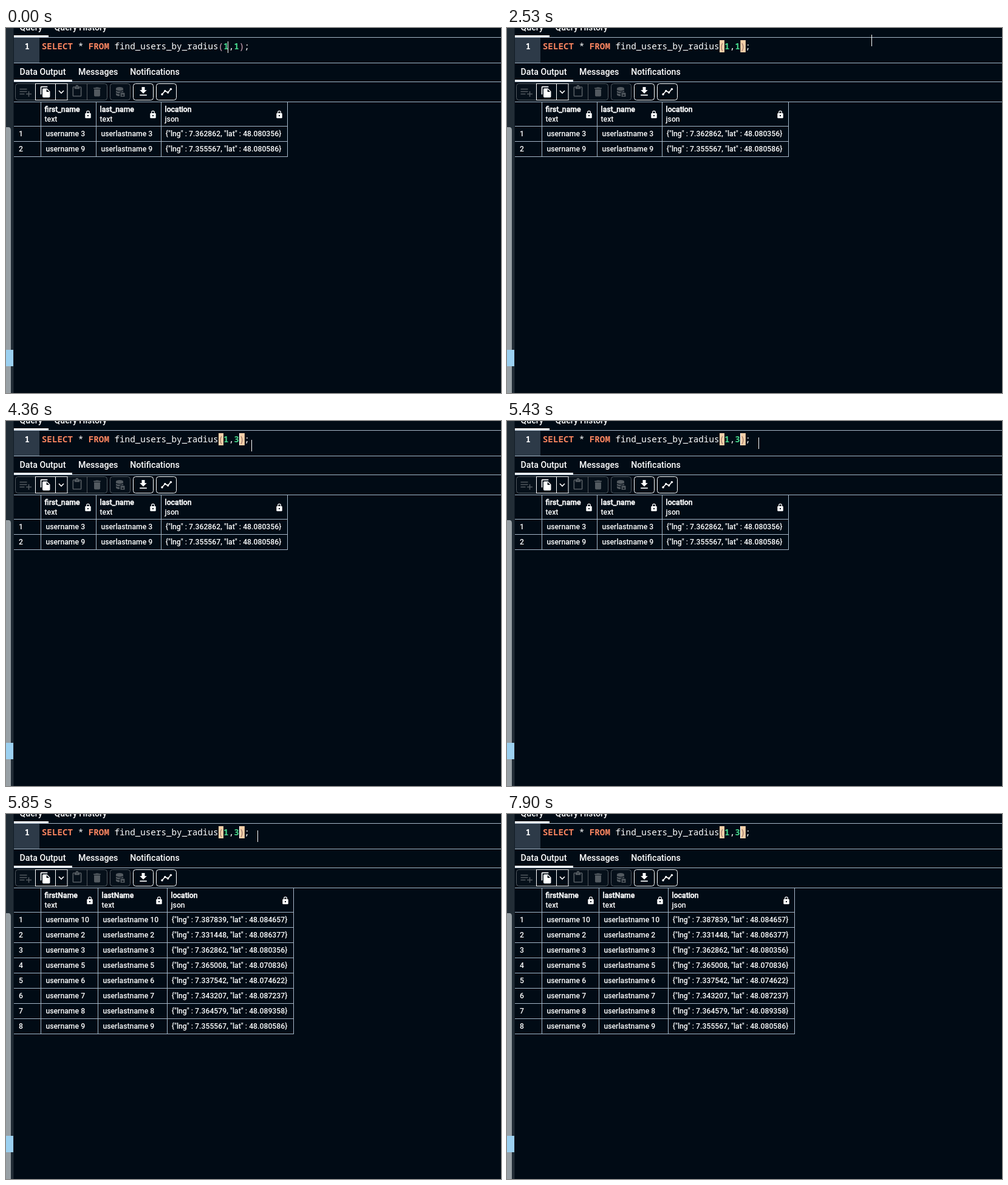
These frames come from a looping animation (815x600 px, 8 s). An HTML page:

```html
<!DOCTYPE html>
<html lang="en">
<head>
<meta charset="utf-8">
<title>Radius query</title>
<style>
  html, body { margin: 0; width: 100%; height: 100%; overflow: hidden; background: #010b15; }
  svg { display: block; width: 815px; height: 600px; }
  text { font-family: Roboto, sans-serif; font-weight: 500; fill: #fff; white-space: pre; }
  .tab { font-size: 14.2px; }
  .cell { font-size: 12.25px; }
  .head { font-size: 12.25px; stroke: #fff; stroke-width: .45px; }
  .code { font: 500 14.25px "Noto Sans Mono", monospace; }
  .kw { font-weight: 700; fill: #f8845f; }
  .num { font-weight: 700; fill: #45d48a; }
  .par { fill: #d6aabb; }
  .matched .par { fill: #9a7468; }
  .wait { font-size: 16.1px; }
</style>
</head>
<body>
<svg id="stage" viewBox="0 0 815 600" xmlns="http://www.w3.org/2000/svg"></svg>
<script>
const LOOP = 8000;
const BG = '#010b15', LINE = '#a6b7c8';
const CODE_X = 58.8, CHAR = 8.55;

const rect = (x, y, w, h, fill, extra = '') =>
  `<rect x="${x}" y="${y}" width="${w}" height="${h}" fill="${fill}" ${extra}/>`;
const text = (x, y, cls, str) => `<text x="${x}" y="${y}" class="${cls}">${str}</text>`;
const stroke = (d, w = 1, color = '#fff') =>
  `<path d="${d}" fill="none" stroke="${color}" stroke-width="${w}"/>`;
const icon = (cx, cy, scale, d) =>
  `<path transform="translate(${cx - 12 * scale} ${cy - 12 * scale}) scale(${scale})" fill="#fff" d="${d}"/>`;
const group = (id, body) => `<g id="${id}">${body}</g>`;

const ICONS = {
  copy: 'M16 1H4q-2 0-2 2v14h2V3h12zM15 5l6 6v10q0 2-2 2H8q-2 0-2-2V7q0-2 2-2zM14 12h5.5L14 6.5z',
  paste: 'M19 2h-4a3 3 0 0 0-6 0H5q-2 0-2 2v16q0 2 2 2h14q2 0 2-2V4q0-2-2-2zM12 2a1 1 0 0 1 0 2 1 1 0 0 1 0-2zM19 20H5V4h2v3h10V4h2z',
  bin: 'M6 19q0 2 2 2h8q2 0 2-2V7H6zM19 4h-3.5l-1-1h-5l-1 1H5v2h14z',
  load: 'M5 20h14v-2H5zM19 9h-4V3H9v6H5l7 7z',
  lock: 'M18 8h-1V6A5 5 0 0 0 7 6v2H6q-2 0-2 2v10q0 2 2 2h12q2 0 2-2V10q0-2-2-2zM12 17a2 2 0 0 1 0-4 2 2 0 0 1 0 4zM15 8H9V6a3 3 0 0 1 6 0z'
};

function frame() {
  return rect(0, 0, 12.5, 600, '#222d36') +
    '<path d="M0 163h4q4 0 4 5V600H0z" fill="#98a0a5"/>' +
    rect(0, 529, 12, 27, '#9bd0f0') +
    text(22.5, 4, 'tab', 'Query') + text(79.5, 4, 'tab', 'Query History') +
    [15, 57, 88].map(y => rect(13, y, 802, 1, LINE)).join('') +
    rect(13, 12, 57, 3, '#fff') + rect(13, 85, 96, 3, '#fff') +
    rect(13, 16, 42, 41, '#2d3a48') +
    '<text x="30.7" y="35" class="code" style="font-weight:700;font-size:13.5px">1</text>' +
    text(22.5, 77, 'tab', 'Data Output') +
    text(119, 77, 'tab', 'Messages') +
    text(204.2, 77, 'tab', 'Notifications');
}

function toolbar() {
  const box = (x, w, fill = 'none') => rect(x + .5, 91.5, w, 27, fill, 'rx="4" stroke="#fff"');
  const zigzag = [0, 1, 2, 3].map(i => [257 + i * 4.8, 109 - i * 1.5 - (i % 2) * 4]);
  const faint = '#fff1';
  const dim =
    box(15, 151, faint) + stroke('M133.5 92v26') + box(171, 33, faint) +
    stroke('M22.5 100.5h12M22.5 104.5h12M22.5 108.5h8M33 108.5h9M37.5 104v9', 1.5) +
    icon(117, 104.5, .83, ICONS.paste) + icon(150, 105, .83, ICONS.bin) +
    '<path d="M181 100v9q0 3 6 3v-3h6v-9z" fill="#fff"/><ellipse cx="187" cy="99.5" rx="6" ry="2.5" fill="#fff"/>' +
    stroke('M181 102.5q6 3 12 0M181 106.5q4 2 7 1.5', 1.2, BG) +
    rect(188, 106, 8, 7.5, '#fff', `stroke="${BG}"`) + rect(190.5, 109.5, 3, 2, BG);
  const lit =
    rect(48.5, 91.5, 52.5, 27, BG, 'stroke="#fff"') + stroke('M81.5 92v26') +
    box(209, 33) + box(247, 33) +
    icon(65, 105, .83, ICONS.copy) + stroke('M87 103l4 4 4-4', 1.7) +
    icon(226, 104.5, .83, ICONS.load) +
    stroke('M' + zigzag.join('L'), 1.6) +
    zigzag.map(([x, y]) => `<circle cx="${x}" cy="${y}" r="1.8" fill="#fff"/>`).join('');
  return `<g opacity=".32">${dim}</g>${lit}`;
}

// cols holds the x of each vertical rule.
function table(id, cols, names, rows) {
  const bottom = 161 + rows.length * 25, right = cols[3];
  let s = '';
  for (const x of cols) s += rect(x, 122, 1, bottom - 121, LINE);
  for (let y = 161; y <= bottom; y += 25) s += rect(13, y, right - 13, 1, LINE);
  names.forEach((name, i) => {
    s += text(cols[i] + 6.5, 138, 'head', name) +
      text(cols[i] + 6.5, 154, 'cell', i < 2 ? 'text' : 'json') +
      icon(cols[i + 1] - 13, 142.3, .59, ICONS.lock);
  });
  rows.forEach((row, i) => {
    const y = 178 + i * 25, [n, lng, lat] = row.split(' ');
    s += text(21, y, 'cell', i + 1) +
      text(cols[0] + 8.4, y, 'cell', 'username ' + n) +
      text(cols[1] + 8.4, y, 'cell', 'userlastname ' + n) +
      text(cols[2] + 7.8, y, 'cell', `{"lng" : ${lng}, "lat" : ${lat}}`);
  });
  return group(id, s);
}

const users = `10 7.387839 48.084657
2 7.331448 48.086377
3 7.362862 48.080356
5 7.365008 48.070836
6 7.337542 48.074622
7 7.343207 48.087237
8 7.364579 48.089358
9 7.355567 48.080586`.split('\n');
const closeBy = users.filter(row => /^[39] /.test(row));

document.getElementById('stage').innerHTML =
  rect(0, 0, 815, 600, BG) + frame() +
  rect(CODE_X + 36 * CHAR, 20, 8.5, 20, '#2b3641', 'id="pick"') +
  group('match', rect(350, 20, 8, 20, '#f5cfa8') + rect(0, 20, 8.6, 20, '#f5cfa8', 'id="close"')) +
  `<text id="code" x="${CODE_X}" y="35" class="code"></text>` +
  rect(0, 20, 1, 20, '#fff', 'id="caret"') +
  toolbar() + rect(13, 121, 802, 1, LINE) +
  table('before', [57, 148, 255, 463], ['first_name', 'last_name', 'location'], closeBy) +
  table('after', [57, 151, 265, 473], ['firstName', 'lastName', 'location'], users) +
  group('busy', rect(13, 89, 802, 511, '#000', 'opacity=".6"') +
    stroke('M706.5 468.5q1.5 1.3 3.5 1', 1.6) +
    text(717.5, 471, 'wait', 'Waiting for the query to complete...')) +
  group('beam', rect(0, -9, 1, 19, '#fff')) +
  group('arrow', '<path d="M.5.3Q.3-.3 1 .3L13 11q.8 1-.5 1.2L6.5 12.6 2 16.3Q.9 17 .8 15.6z" fill="#05080c" stroke="#fff" stroke-width="1.2"/>');

const el = id => document.getElementById(id);
const show = (id, on) => el(id).setAttribute('display', on ? 'inline' : 'none');

const SELECT = 1560, CLICK = 1990, ERASE = 2930, TYPE = 3250, RUN = 5720, DONE = 5850;
const BLINK = 540, HOLD = 130;

// Each leg glides the pointer to a point between two times.
const legs = [
  { from: 150, to: 700, x: 760, y: -40 },
  { from: 1000, to: 1420, x: 314, y: 30 },
  { from: 1420, to: SELECT, x: 394, y: 23 },
  { from: 1690, to: 2240, x: 600, y: 20 },
  { from: 3790, to: 4180, x: 304, y: 80 },
  { from: 4180, to: 4360, x: 391, y: 46 },
  { from: 4360, to: 4600, x: 414, y: 36 },
  { from: 6250, to: 6600, x: 350, y: 250 },
  { from: 6600, to: 6970, x: 400, y: 36 },
  { from: 7250, to: 7900, x: 830, y: 30 }
];

const smooth = p => p * p * (3 - 2 * p);

// The pointer is redrawn only once per HOLD.
function pointerAt(t) {
  let x = 365, y = 31;
  for (const leg of legs) {
    if (t < leg.from) break;
    const steps = Math.floor((t - leg.from) / HOLD) + 1;
    const p = t >= leg.to ? 1 : smooth(Math.min(1, steps * HOLD / (leg.to - leg.from)));
    x += (leg.x - x) * p;
    y += (leg.y - y) * p;
  }
  return [Math.round(x), Math.round(y)];
}

function caretOn(t) {
  const key = [TYPE, ERASE, CLICK].find(time => t >= time);
  return key !== undefined && (t - key) % (2 * BLINK) < BLINK;
}

function codeFor(digit) {
  return '<tspan class="kw">SELECT</tspan> * <tspan class="kw">FROM</tspan> find_users_by_radius' +
    '<tspan class="par">(</tspan><tspan class="num">1</tspan>,' +
    `<tspan class="num">${digit}</tspan><tspan class="par">)</tspan>;`;
}

let shown;
function draw(t) {
  const digit = t < ERASE ? '1' : t < TYPE + 100 ? '' : '3';
  if (digit !== shown) el('code').innerHTML = codeFor(shown = digit);

  const end = CODE_X + (37 + digit.length) * CHAR + .6;
  el('close').setAttribute('x', end);
  el('caret').setAttribute('x', Math.floor(end));
  el('code').classList.toggle('matched', t >= CLICK);
  show('match', t >= CLICK);
  show('pick', t >= SELECT && t < CLICK);
  show('caret', caretOn(t));

  show('before', t < DONE);
  show('after', t >= DONE);
  show('busy', t >= RUN && t < DONE);

  const [x, y] = pointerAt(t), inEditor = y < 45;
  show('beam', inEditor);
  show('arrow', !inEditor);
  el(inEditor ? 'beam' : 'arrow').setAttribute('transform', `translate(${x} ${y})`);
}

const start = performance.now();
function tick() {
  draw((performance.now() - start) % LOOP);
  requestAnimationFrame(tick);
}
tick();
</script>
</body>
</html>
```
